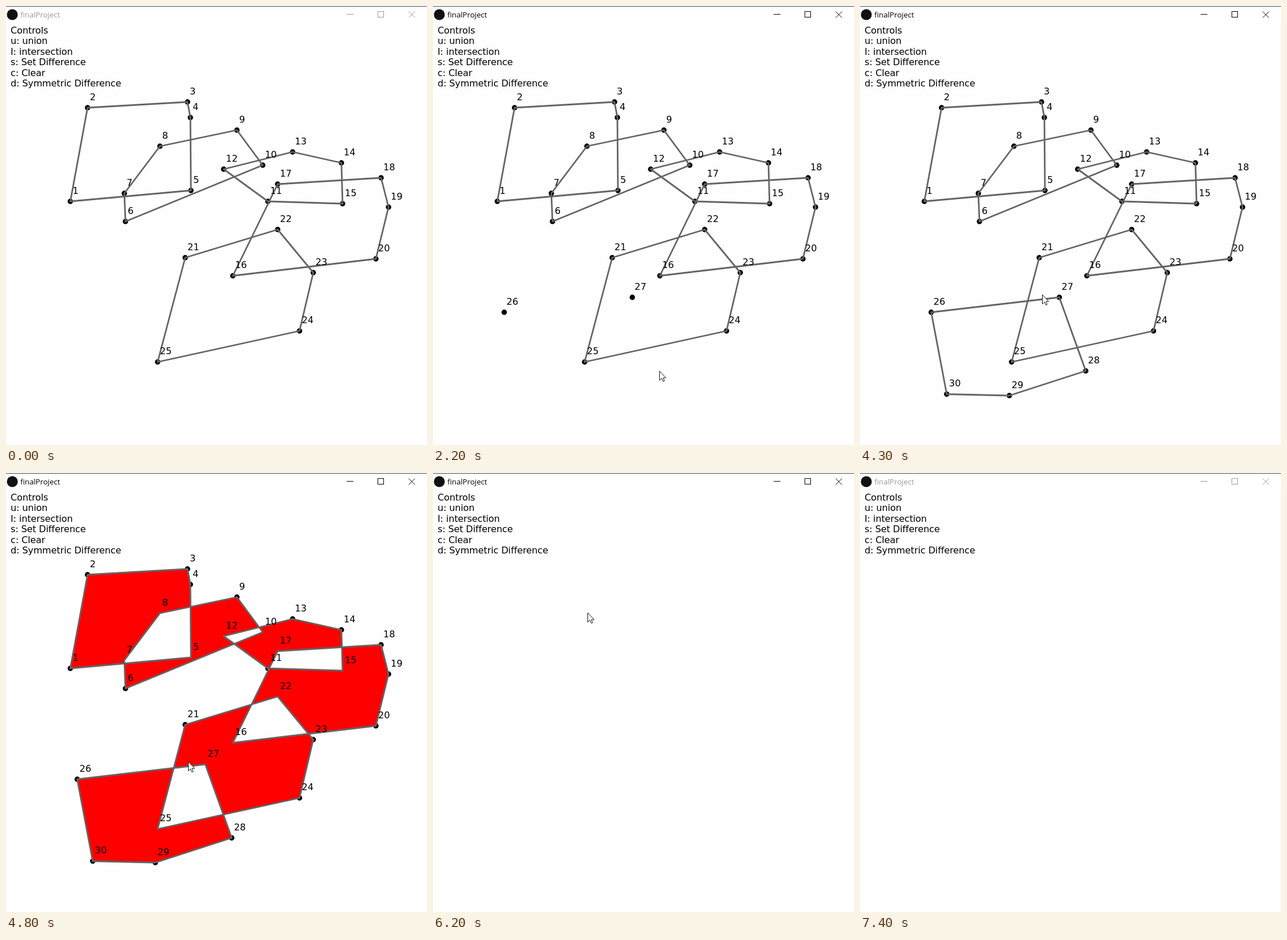
An HTML page with a canvas for the animation above (7.5 s loop, 733 by 764 pixels).

```html
<!DOCTYPE html>
<html lang="en">
<head>
<meta charset="utf-8">
<title>finalProject</title>
<style>
  html, body { margin: 0; width: 733px; height: 764px; overflow: hidden; background: #fefefe; }
  canvas { display: block; }
</style>
</head>
<body>
<canvas id="stage" width="733" height="764"></canvas>
<script>
const ctx = document.getElementById('stage').getContext('2d');
const LOOP = 7500, STEP = 100;

// Five consecutive points form one polygon.
const points = [
  [112, 340], [142, 177], [316, 167], [321, 194], [322, 321],
  [208, 375], [206, 326], [268, 244], [402, 216], [447, 277],
  [456, 340], [379, 284], [499, 254], [584, 273], [586, 344],
  [395, 469.5], [473, 310], [653, 299], [666, 350], [644, 440],
  [312, 438], [473, 389], [535, 464], [511, 565.5], [264, 619.5],
  [124, 533], [347, 507], [393, 635], [260, 678], [151, 675.5]
];
const clicks = [1000, 1600, 2400, 2900, 3500];
const unionAt = 4800, clearAt = 6200, activeFrom = 1000, activeTo = 7400;

// Pointer keys: time, x, y
const pointer = [
  [300, 20, 60], [900, 124, 533], [1000, 124, 533], [1500, 347, 508],
  [1800, 347, 508], [2200, 394, 635], [2400, 394, 635], [2800, 260, 678],
  [2900, 260, 678], [3100, 232, 692], [3400, 151, 675], [3800, 151, 675],
  [4300, 317, 502], [5200, 317, 502], [5800, 269, 243], [6200, 269, 243],
  [6400, 59, 70]
];
const arrow = [[0, 0], [0, 16], [3.7, 12.6], [6.2, 18], [8.5, 17], [6.2, 11.6], [11, 11.6]];
const controls = ['Controls', 'u: union', 'I: intersection', 's: Set Difference',
  'c: Clear', 'd: Symmetric Difference'];

function polygon(list, x = 0, y = 0) {
  const path = new Path2D();
  list.forEach(([px, py]) => path.lineTo(px + x, py + y));
  path.closePath();
  return path;
}

function line(x1, y1, x2, y2) {
  ctx.beginPath();
  ctx.moveTo(x1, y1);
  ctx.lineTo(x2, y2);
  ctx.stroke();
}

function drawWindow(active) {
  ctx.fillStyle = '#fefefe';
  ctx.fillRect(0, 0, 733, 764);
  ctx.fillStyle = '#fff';
  ctx.fillRect(0, 0, 733, 30);
  ctx.fillStyle = '#3c4c5c';
  ctx.fillRect(0, 0, 733, 1);

  ctx.fillStyle = '#111';
  ctx.beginPath();
  ctx.arc(11, 15, 9.5, 0, 7);
  ctx.fill();

  ctx.fillStyle = ctx.strokeStyle = active ? '#000' : '#999';
  ctx.font = '13.2px "Open Sans", sans-serif';
  ctx.fillText('finalProject', 25, 20);
  ctx.lineWidth = 1;
  line(593, 14.5, 605, 14.5);
  ctx.strokeRect(647.5, 9.5, 10, 10);
  line(701, 9.5, 712, 20.5);
  line(712, 9.5, 701, 20.5);

  ctx.fillStyle = '#000';
  ctx.font = '16px "DejaVu Sans", sans-serif';
  ctx.letterSpacing = '-0.12px';
  controls.forEach((text, i) => ctx.fillText(text, 8, 48 + 18.4 * i));
  ctx.letterSpacing = '0px';
}

function drawPolygons(count, filled) {
  const shown = points.slice(0, count);
  const paths = [];
  for (let i = 0; i + 5 <= count; i += 5) paths.push(polygon(points.slice(i, i + 5)));

  ctx.fillStyle = '#000';
  for (const [x, y] of shown) {
    ctx.beginPath();
    ctx.arc(x, y, 4.7, 0, 7);
    ctx.fill();
  }
  if (filled) {
    const all = new Path2D();
    ctx.fillStyle = '#fefefe';
    for (const path of paths) {
      ctx.fill(path);
      all.addPath(path);
    }
    ctx.fillStyle = '#f00';
    ctx.fill(all, 'evenodd');
  }
  ctx.strokeStyle = '#646464';
  ctx.lineWidth = 2.8;
  ctx.lineJoin = 'round';
  paths.forEach(path => ctx.stroke(path));

  ctx.fillStyle = '#000';
  shown.forEach(([x, y], i) => ctx.fillText(i + 1, x + 4, y - 13.5));
}

function drawPointer(t) {
  if (t < pointer[0][0] || t > pointer.at(-1)[0]) return;
  const next = Math.max(1, pointer.findIndex(key => key[0] >= t));
  const [t0, x0, y0] = pointer[next - 1], [t1, x1, y1] = pointer[next];
  const u = (t - t0) / (t1 - t0), ease = u * u * (3 - 2 * u);
  const x = Math.round(x0 + (x1 - x0) * ease), y = Math.round(y0 + (y1 - y0) * ease);
  const shape = polygon(arrow, x + 0.5, y + 0.5);
  ctx.fillStyle = '#fff';
  ctx.strokeStyle = '#111';
  ctx.lineWidth = 1;
  ctx.lineJoin = 'miter';
  ctx.fill(shape);
  ctx.stroke(shape);
}

function draw(now) {
  const t = Math.floor(now % LOOP / STEP) * STEP;
  drawWindow(t >= activeFrom && t < activeTo);
  if (t < clearAt) drawPolygons(25 + clicks.filter(c => t >= c).length, t >= unionAt);
  drawPointer(t);
  requestAnimationFrame(draw);
}
requestAnimationFrame(draw);
</script>
</body>
</html>
```
